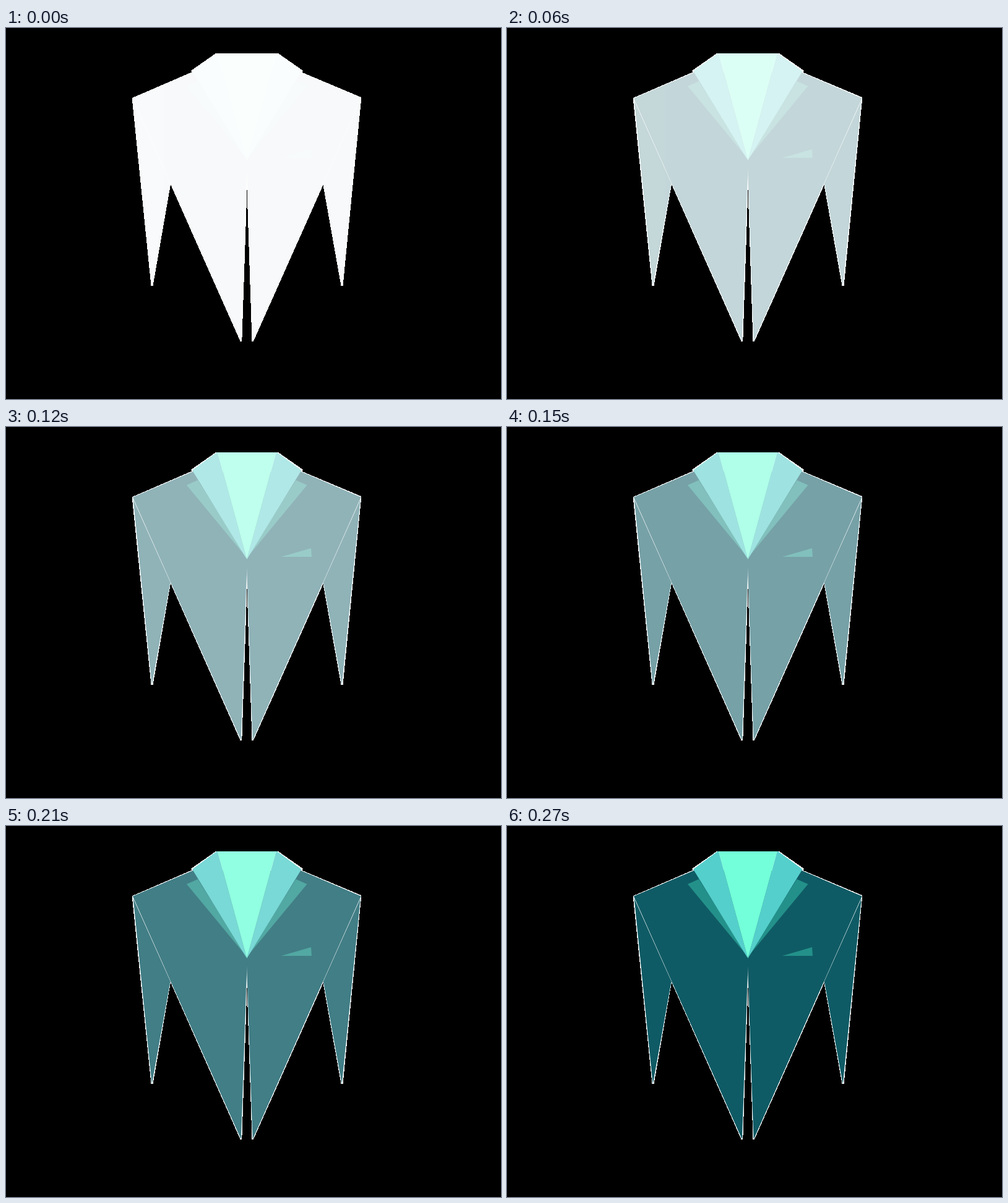
Animation, 800 px wide and 600 px high, one loop 0.54 s. Source, as an HTML page:

```html
<!DOCTYPE html>
<html lang="en">
<head>
<meta charset="utf-8">
<title>Suit</title>
<style>
  html, body { margin: 0; height: 100%; overflow: hidden; background: #000; }
  svg { display: block; width: 800px; height: 600px; }
</style>
</head>
<body>
<svg viewBox="0 0 800 600">
  <!-- white silhouette -->
  <path fill="#fff" shape-rendering="crispEdges" d="M339 41H440L480 69 479 72 574 112V117L544.5 417H541.5L512.5 254 400 506.5H397.5L389.5 262 381.300 506.5H378.5L266 253 237.5 417H234.5L204 117V113L300 71.500 299 69Z"/>
  <g id="suit">
    <g id="half">
      <path fill="#0f5b65" d="M204.800 113.500 302 72H390V226H389.500L380 505.500H379.300ZM205.600 117 266 252 265 255 236 416H235.500Z"/>
      <path fill="#23918a" d="M292 94 310 86 389.500 212Z"/>
      <path fill="#55cfcc" d="M301 70 340.500 41H342L389.250 214Z"/>
    </g>
    <use href="#half" transform="translate(778.5) scale(-1 1)"/>
    <path fill="#73ffd9" d="M342 41H436.500L389.250 214Z"/>
    <path fill="#23918a" d="M445 210 493 196 494 210Z"/>
  </g>
</svg>
<script>
  const LOOP = 540, STEP = 30, LAST = 9, START = 0.027;
  const suit = document.getElementById("suit");

  // The colours fade in by equal steps, then hold until the loop restarts.
  function draw() {
    const step = Math.min(LAST, Math.floor(performance.now() % LOOP / STEP));
    suit.setAttribute("opacity", START + (1 - START) * step / LAST);
    requestAnimationFrame(draw);
  }
  draw();
</script>
</body>
</html>
```
